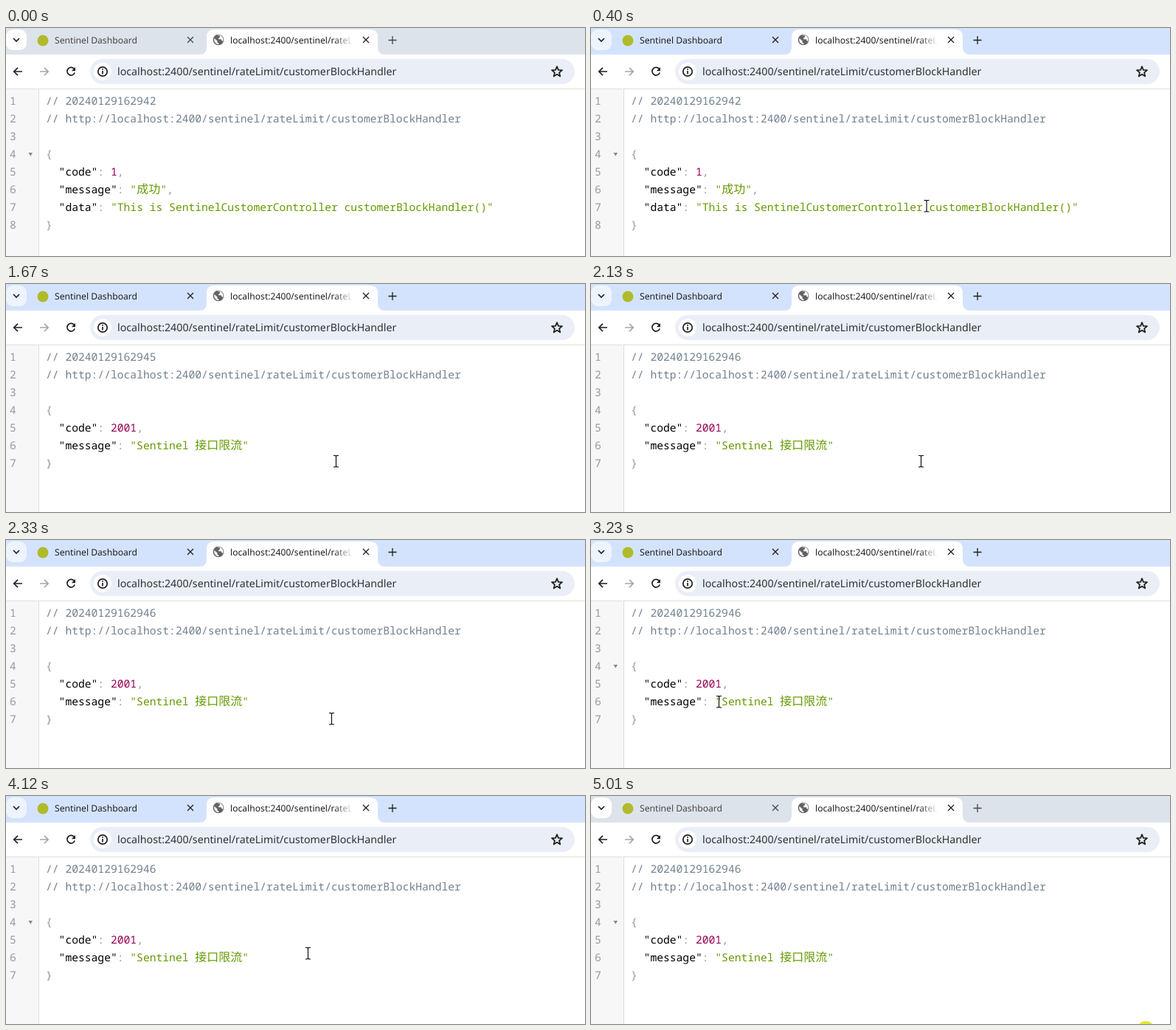
Animation of 785 by 309 pixels, one loop 5090 ms. Source, as an HTML page:

```html
<!DOCTYPE html>
<html lang="en">
<head>
<meta charset="utf-8">
<title>Rate limit demo</title>
<style>
  html, body { margin: 0; width: 100%; height: 100%; overflow: hidden; background: #fff; }
  svg { display: block; width: 785px; height: 309px; --strip: #dde3ea; --button: #fff; --label: #474747; }
  svg.active { --strip: #d3e3fd; --button: #eef4fe; --label: #1f1f1f; }
  text { white-space: pre; text-rendering: geometricPrecision; }
  .ui { font-family: "Noto Sans", "Open Sans", sans-serif; fill: #1f1f1f; }
  .code { font: 14.66px "Noto Sans Mono", "DejaVu Sans Mono", monospace; }
  .cjk { font: 300 16px "Noto Sans CJK SC", "Noto Sans CJK", sans-serif; }
  .icon { fill: none; stroke: #1f1f1f; stroke-width: 1.7; }
  .thin { stroke-width: 1.3; }
  .label { fill: var(--label); }
  .tool { stroke: var(--label); }
  .note { fill: #708090; }
  .mark { fill: #999; }
  .num { fill: #905; }
  .str { fill: #690; }
</style>
</head>
<body>
<svg id="stage" viewBox="0 0 785 309">
  <defs>
    <linearGradient id="fade">
      <stop offset="0" stop-color="#fff" stop-opacity="0"/>
      <stop offset="1" stop-color="#fff"/>
    </linearGradient>
    <clipPath id="tabClip"><rect x="300" y="4" width="171" height="28"/></clipPath>
  </defs>

  <!-- tab strip -->
  <rect width="785" height="36" style="fill:var(--strip)"/>
  <rect x="0" y="2" width="28" height="28" rx="9" style="fill:var(--button)"/>
  <path class="icon" d="M10 14l4 4 4-4"/>
  <circle cx="50" cy="17" r="7.5" fill="#b1ba2c"/>
  <text class="ui label" x="66" y="21" font-size="12.15">Sentinel Dashboard</text>
  <path d="M262 36q10 0 10-10V12q0-10 10-10H494q10 0 10 10V26q0 10 10 10z" fill="#fff"/>
  <path class="icon thin tool" d="M246 12l8 8m0-8l-8 8"/>
  <path class="icon thin" d="M484 12l8 8m0-8l-8 8"/>
  <path class="icon thin tool" d="M518.5 16.500h11M524 11v11"/>
  <g id="globe">
    <circle cx="288" cy="16" r="7.3" fill="#5f6368"/>
    <path d="M282.5 14l4 3.5v2l2 1.5v1.2q-6-.8-6.3-6zM286 10.2h3.6l1 1.8-2.4 1.6v1.6h3.5l1.4 2.6 1 .3q1.2-4.6-2-7.3-2.7-2-6.1-.6z" fill="#fff"/>
  </g>
  <g clip-path="url(#tabClip)">
    <text class="ui" x="304" y="21" font-size="12.15">localhost:2400/sentinel/rateLimit</text>
    <rect x="444" y="4" width="27" height="28" fill="url(#fade)"/>
  </g>

  <!-- toolbar -->
  <rect y="36" width="785" height="47" fill="#fff"/>
  <rect y="82" width="785" height="1" fill="#dfe1e5"/>
  <path class="icon" d="M22 59H11.5M16 53.8l-5.2 5.2 5.2 5.2"/>
  <path class="icon" style="stroke:#a6a6a6" d="M46 59h10.5M52 53.8l5.2 5.2-5.2 5.2"/>
  <g id="reload">
    <path class="icon" d="M92.5 55.6A5.3 5.3 0 1 0 93.2 60.5"/>
    <path d="M94 53v5.2h-5.2z" fill="#1f1f1f"/>
  </g>
  <path id="stop" class="icon" style="stroke:#777" d="M83 54l10 10m0-10l-10 10"/>
  <rect x="114" y="42" width="657" height="34" rx="17" fill="#e9eef7"/>
  <circle cx="131" cy="59" r="12" fill="#fff"/>
  <circle class="icon" cx="131" cy="59" r="6.2"/>
  <path class="icon" d="M131 58v4.5M131 55v1.7"/>
  <text class="ui" x="151" y="64" font-size="14.24" style="fill:#303134">localhost:2400/sentinel/rateLimit/customerBlockHandler</text>
  <path id="star" class="icon" stroke-linejoin="round"/>

  <!-- page -->
  <g id="page">
    <rect y="83" width="44" height="226" fill="#f7f7f7"/>
    <rect x="44" y="83" width="1" height="226" fill="#ddd"/>
    <g id="lines"></g>
    <path id="fold" d="M30.5 169h5.600l-2.800 4.800z" fill="#8a8a8a"/>
  </g>

  <circle id="spot" cx="752" cy="317" r="12" fill="#e6e62e"/>
  <g id="cursor">
    <path id="beam" d="M-3.5-7.5h2.5l1 1 1-1h2.5M0-7v14.5M-3.5 8h2.5l1-1 1 1h2.5" fill="none" stroke="#000" stroke-width="1.1"/>
    <path id="arrow" d="M.5.5v15l3.400-3.200 2.300 5.200 2.300-1-2.300-5h4.500z" fill="#fff" stroke="#000"/>
  </g>
</svg>

<script>
const LOOP = 5090;
const FOCUS = [70, 5010]; // the window is active between these times
const $ = id => document.getElementById(id);
const show = (id, on) => { $(id).style.display = on ? "" : "none"; };
const span = (cls, s) => `<tspan class="${cls}">${s}</tspan>`;

// Page states: start, body, seconds of the time stamp, loading, fold mark
const STATES = [
  [0, "ok", 42, false, true],
  [1060, "", 0, true, false],
  [1200, "ok", 45, false, false],
  [1340, "", 0, true, false],
  [1410, "limit", 45, false, false],
  [1600, "limit", 45, true, false],
  [1670, "limit", 45, false, false],
  [1870, "", 0, true, false],
  [2010, "limit", 46, false, false],
  [2600, "limit", 46, false, true]
];

// Pointer path: time, x, y
const PATH = [
  [70, 690, 298], [140, 625, 283], [210, 552, 264], [280, 490, 249],
  [350, 455, 241], [400, 447.5, 240], [2260, 447.5, 240], [2330, 441.5, 242],
  [2450, 434, 243], [2660, 400, 238], [2940, 330, 222], [3090, 245, 220],
  [3230, 173.5, 219], [3300, 164, 218], [3510, 183, 220], [3710, 285, 222],
  [3920, 402, 214], [3990, 414, 212], [4110, 414, 212], [4120, 409.5, 213],
  [4190, 400, 214], [4260, 432, 222], [4400, 560, 260], [4540, 700, 301], [4610, 740, 330]
];

const TICKS = [0, 70, 1060, 1600, 1870, 2330, 2450, 3020, 3570, 4120, 5010];

const lastBefore = (list, t, key) => list.filter(e => key(e) <= t).pop();

function tick(t) {
  const start = lastBefore(TICKS, t, e => e);
  return start + Math.floor((t - start) / 70) * 70;
}

function pointer(t) {
  const i = PATH.findIndex(p => p[0] > t);
  if (i < 1) return null;
  const [t0, x0, y0] = PATH[i - 1], [t1, x1, y1] = PATH[i];
  const k = (t - t0) / (t1 - t0);
  return [x0 + (x1 - x0) * k, y0 + (y1 - y0) * k];
}

function field(name, value, comma) {
  return `  "${name}"` + span("mark", ": ") + value + (comma ? span("mark", ",") : "");
}

function drawLines(kind, sec) {
  const text = s => span("str", s);
  const cjk = s => span("str cjk", s);
  const body = kind === "ok"
    ? [field("code", span("num", 1), true),
       field("message", text('"') + cjk("成功") + text('"'), true),
       field("data", text('"This is SentinelCustomerController customerBlockHandler()"'))]
    : [field("code", span("num", 2001), true),
       field("message", text('"Sentinel ') + cjk("接口限流") + text('"'))];
  const lines = [
    span("note", "// 202401291629" + sec),
    span("note", "// http://localhost:2400/sentinel/rateLimit/customerBlockHandler"),
    "", span("mark", "{"), ...body, span("mark", "}")
  ];
  $("lines").innerHTML = lines.map((line, i) => {
    const y = 104 + 24 * i;
    return `<text class="code mark" x="5" y="${y}">${i + 1}</text>` +
           `<text class="code" x="54" y="${y}">${line}</text>`;
  }).join("");
}

let current = null;
function setState(state) {
  if (state === current) return;
  current = state;
  const [, kind, sec, loading, fold] = state;
  show("page", kind);
  show("fold", fold);
  show("globe", !loading);
  show("reload", !loading);
  show("stop", loading);
  show("beam", !(loading && kind));
  show("arrow", loading && kind);
  if (kind) drawLines(kind, sec);
}

function render(now) {
  const t = now % LOOP;
  setState(lastBefore(STATES, t, s => s[0]));
  $("stage").classList.toggle("active", t >= FOCUS[0] && t < FOCUS[1]);
  const p = pointer(tick(t));
  show("cursor", p);
  if (p) $("cursor").setAttribute("transform", `translate(${p})`);
  show("spot", t >= FOCUS[1]);
}

const starPoints = Array.from({ length: 10 }, (_, i) => {
  const a = (i / 5 - 0.5) * Math.PI, r = i % 2 ? 3.2 : 7.4;
  return (747 + r * Math.cos(a)).toFixed(2) + " " + (59.5 + r * Math.sin(a)).toFixed(2);
});
$("star").setAttribute("d", "M" + starPoints.join("L") + "z");

let begin = null;
function loop(now) {
  if (begin === null) begin = now;
  render(now - begin);
  requestAnimationFrame(loop);
}
render(0);
requestAnimationFrame(loop);
</script>
</body>
</html>
```
